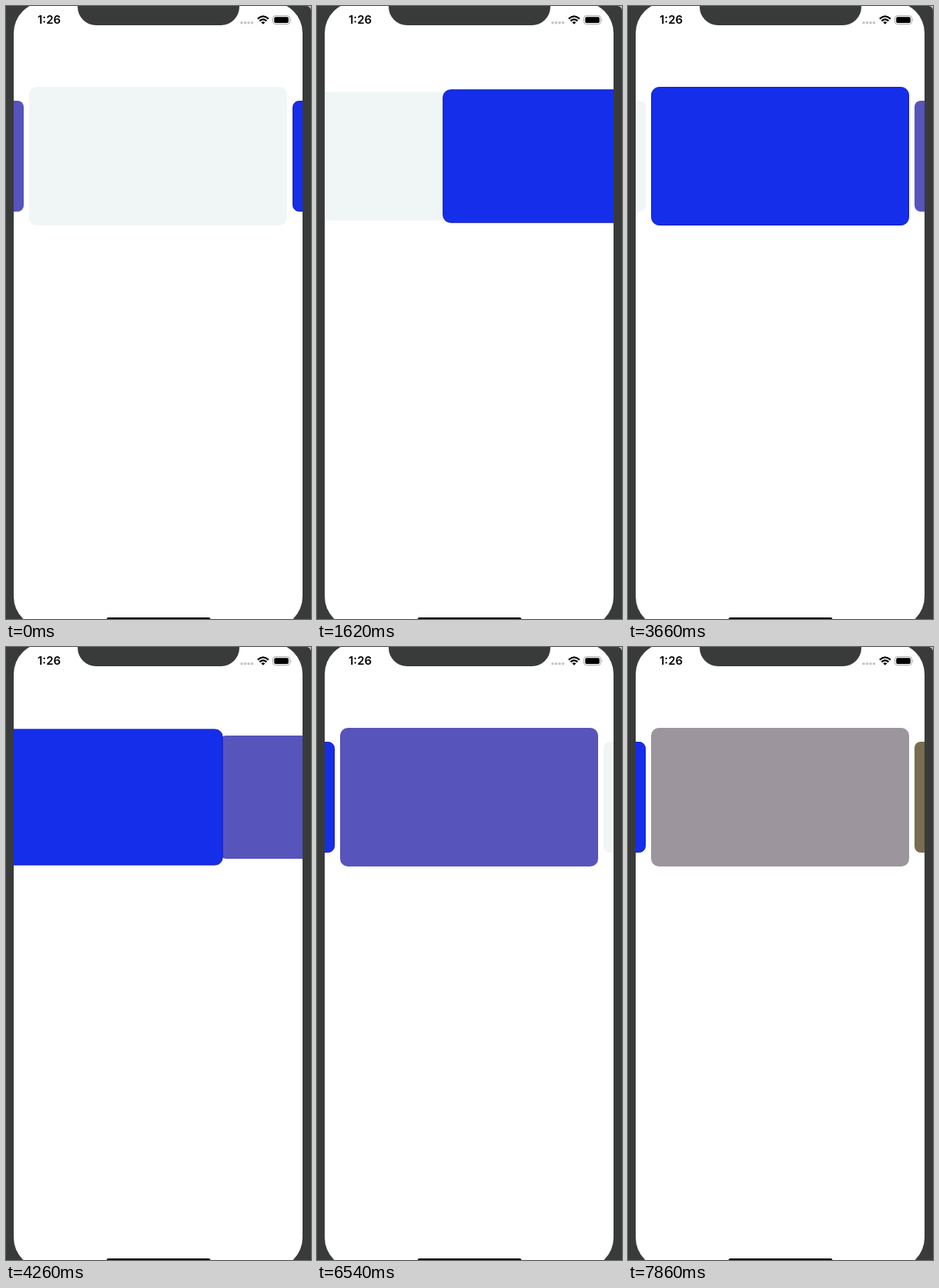
Animation, 396 px wide and 796 px high, one loop 7920 ms. Source, as an HTML page:

```html
<!DOCTYPE html>
<html lang="en">
<head>
<meta charset="utf-8">
<title>Card carousel</title>
<style>
  html, body { margin: 0; width: 100%; height: 100%; overflow: hidden; background: #393b3a; }
  svg { display: block; width: 396px; height: 796px; }
  text { font: 600 15px Inter, "Liberation Sans", sans-serif; }
</style>
</head>
<body>
<svg viewBox="0 0 396 796">
  <defs>
    <clipPath id="screen"><rect x="10" y="-5" width="375" height="812" rx="40"/></clipPath>
  </defs>
  <rect width="396" height="796" fill="#393b3a"/>
  <path d="M391 0H396V5Q395 1 391 0Z" fill="#c8c8c8"/>
  <g clip-path="url(#screen)">
    <rect width="396" height="796" fill="#fff"/>
    <g id="cards"></g>
    <rect x="130.500" y="794" width="135" height="5" rx="2.500"/>
  </g>
  <path d="M93 0V1A24 24 0 0 0 117 25H279A24 24 0 0 0 303 1V0Z" fill="#393b3a"/>
  <text x="41" y="23">1:26</text>
  <g fill="#c4c4c4">
    <circle cx="306" cy="21.700" r="1.800"/>
    <circle cx="310.500" cy="21.700" r="1.800"/>
    <circle cx="315" cy="21.700" r="1.800"/>
    <circle cx="319.500" cy="21.700" r="1.800"/>
  </g>
  <g fill="none" stroke="#000" stroke-width="2.200">
    <path d="M326.800 16.600Q333.800 10.200 340.800 16.600"/>
    <path d="M329.300 19.400Q333.800 15.400 338.300 19.400"/>
  </g>
  <path d="M331.300 21.200Q333.800 19.200 336.300 21.200L333.800 23.700Z"/>
  <rect x="346.500" y="12.700" width="22" height="10.800" rx="3" fill="none" stroke="#a4a4a4"/>
  <rect x="348.200" y="14.300" width="18.600" height="7.600" rx="1.700"/>
  <path d="M369.700 16.200Q371.300 18.100 369.700 20Z" fill="#a4a4a4"/>
</svg>
<script>
const LOOP = 7920, STEP = 60;
const CARD = { width: 335, height: 180, radius: 10, x: 197.5, y: 195, pitch: 308.5 };
const MINT = '#f0f6f5', BLUE = '#142eea', PURPLE = '#5754bc';
const palette = [MINT, BLUE, PURPLE];
const recoloured = { 14: '#9c959d', 15: '#796c51' };

// Each swipe advances the carousel by one card: [start, end] in ms.
const swipes = [
  [0, 475], [475, 949], [949, 1424], [1424, 1872], [1872, 2328], [2328, 2784], [2784, 3240],
  [4140, 4620],
  [5220, 5656], [5656, 6092], [6092, 6528], [6600, 7152], [7152, 7446], [7446, 7740]
];

const group = document.getElementById('cards');
const slots = Array.from({ length: 4 }, () =>
  group.appendChild(document.createElementNS('http://www.w3.org/2000/svg', 'rect')));

const clamp = v => Math.min(1, Math.max(0, v));
const ease = u => 1 - (1 - u) ** 3 * (1 + 3 * u);
const position = t => swipes.reduce((sum, [a, b]) => sum + ease(clamp((t - a) / (b - a))), 0);

function setAttributes(node, values) {
  for (const name in values) node.setAttribute(name, values[name]);
}

function drawCard(node, index, pos) {
  const offset = index - pos;
  const scale = 1 - 0.2 * Math.min(1, Math.abs(offset)) ** 1.9;
  const fill = recoloured[index] || palette[(index + 3) % 3];
  // The first card after a wrap appears only once the wrap has settled.
  const pending = (index + 3) % 3 === 1 && pos < index - 1 - 1e-6;
  const inset = fill === BLUE ? 0.5 : 0;
  const width = CARD.width * scale - 2 * inset;
  const height = CARD.height * scale - 2 * inset;
  setAttributes(node, {
    x: CARD.x + CARD.pitch * offset - width / 2,
    y: CARD.y - height / 2,
    width, height,
    rx: CARD.radius * scale,
    fill,
    stroke: inset ? '#1a1cbc' : 'none',
    visibility: pending ? 'hidden' : 'visible'
  });
}

function render(time) {
  const pos = position(Math.floor((time % LOOP) / STEP) * STEP);
  const first = Math.floor(pos) - 1;
  const order = slots.map((_, i) => first + i)
    .sort((a, b) => Math.abs(b - pos) - Math.abs(a - pos));
  order.forEach((index, i) => drawCard(slots[i], index, pos));
}

const origin = performance.now();
function tick() {
  render(performance.now() - origin);
  requestAnimationFrame(tick);
}
tick();
</script>
</body>
</html>
```
